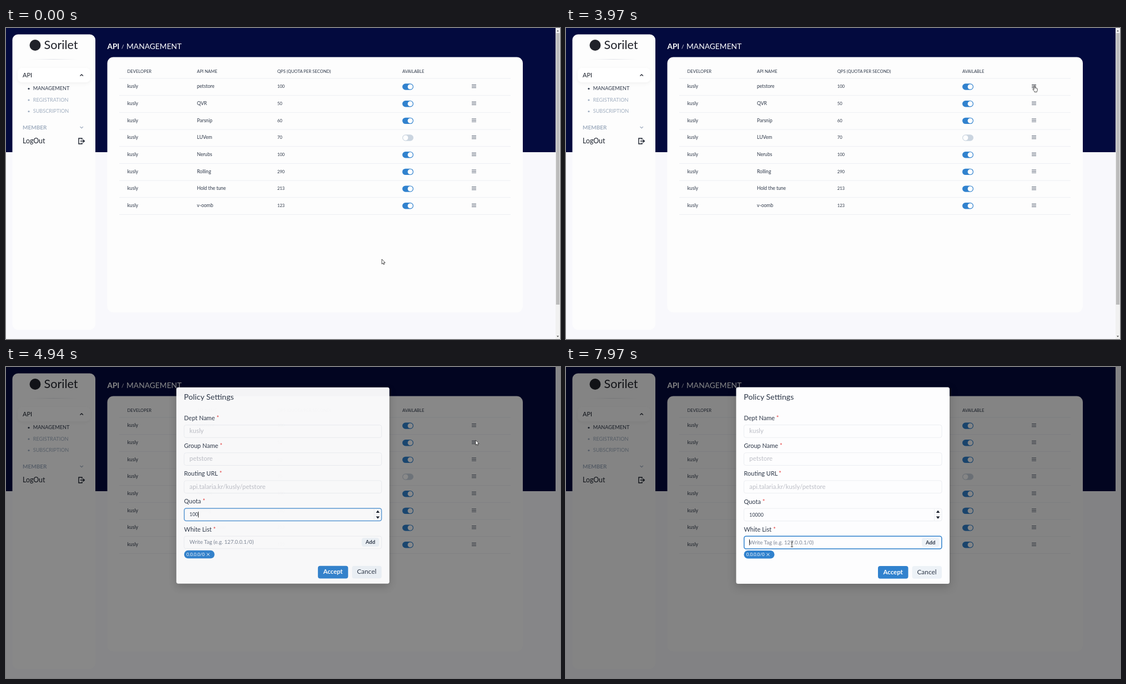
An HTML page that plays this animation: 998x561 px, repeating every 8 s.

```html
<!DOCTYPE html>
<html lang="en">
<head>
<meta charset="utf-8">
<title>API management</title>
<style>
  html, body { margin: 0; width: 100%; height: 100%; overflow: hidden; background: #f8f8fc; }
  svg { display: block; width: 998px; height: 561px; }
  text { font-family: Lato, "Open Sans", sans-serif; white-space: pre; }
  #apiBox { filter: drop-shadow(0 2px 3px #0000000d); }
  #menu rect:first-child { filter: drop-shadow(0 1px 3px #00000026); }
  #panel { filter: drop-shadow(0 5px 8px #00000033); }
</style>
</head>
<body>
<svg id="stage" viewBox="0 0 998 561" xmlns="http://www.w3.org/2000/svg">
  <defs>
    <linearGradient id="fade">
      <stop offset="0" stop-color="#dfe1e6" stop-opacity="0"/>
      <stop offset=".5" stop-color="#dfe1e6"/>
      <stop offset="1" stop-color="#dfe1e6" stop-opacity="0"/>
    </linearGradient>
  </defs>
  <g id="page"></g>
  <g id="scrollbar"></g>
  <g id="menu"></g>
  <rect id="dim" width="998" height="561" fill="#000"/>
  <g id="modal"></g>
  <g id="pointer" stroke-linejoin="round">
    <path id="arrow" d="M0 0V8.8L2 7 3.2 9.8 4.6 9.2 3.5 6.4H6.1Z" fill="#fff" stroke="#222" stroke-width=".8"/>
    <path id="hand" d="M.1 5.9V1Q.1 0 1 0T1.9 1V4Q3.2 3.5 3.5 4.4 4.6 4 4.9 4.9 6.1 4.7 6.1 6V8.2Q6.1 9.3 5.3 10.4V11.4H.9V10.4L-2 7.2Q-2.3 6-1.3 5.9L.1 7.1Z"
      fill="#fff" stroke="#222" stroke-width=".8"/>
    <path id="beam" d="M-2-4.5H-.7L0-4 .7-4.5H2M0-4V4M-2 4.5H-.7L0 4 .7 4.5H2" fill="none" stroke="#222" stroke-width=".9"/>
  </g>
</svg>
<script>
const LOOP = 8000;
const INK = '#2d3748', MUTED = '#a0aec0', BLUE = '#3182ce', PALE = '#edf2f7', LINE = '#edeff3', PAPER = '#fdfdfd';
const $ = id => document.getElementById(id);

function add(parent, tag, attrs, content) {
  const node = document.createElementNS('http://www.w3.org/2000/svg', tag);
  for (const key in attrs) node.setAttribute(key, attrs[key]);
  if (content !== undefined) node.textContent = content;
  return parent.appendChild(node);
}
const box = (parent, x, y, width, height, rx, fill, more) =>
  add(parent, 'rect', { x, y, width, height, rx, fill, ...more });
const label = (parent, x, y, size, content, fill = INK, more) =>
  add(parent, 'text', { x, y, 'font-size': size, fill, ...more }, content);
const stroke = (parent, d, color, width = 1) =>
  add(parent, 'path', { d, fill: 'none', stroke: color, 'stroke-width': width });
const fillPath = (parent, d, fill) => add(parent, 'path', { d, fill });

function drawSidebar(g) {
  box(g, 11.5, 11.5, 149.5, 533, 10, PAPER);
  add(g, 'circle', { cx: 52.5, cy: 31, r: 10, fill: '#20222a' });
  label(g, 68.5, 38, 21.6, 'Sorilet', '#20222a');
  box(g, 42, 56, 87, 1, 0, 'url(#fade)');
  box(g, 21, 72, 131, 26, 8, '#fff', { id: 'apiBox' });
  label(g, 30, 88.6, 11, 'API', '#1a202c');
  stroke(g, 'M133.5 86.5 136.2 83.8 138.9 86.5', '#1a202c', 1.3);
  ['MANAGEMENT', 'REGISTRATION', 'SUBSCRIPTION'].forEach((name, i) => {
    const y = 109 + i * 20.5, color = i ? MUTED : INK;
    add(g, 'circle', { cx: 41, cy: y + .5, r: 1.6, fill: color });
    label(g, 48.7, y + 3.4, 9.15, name, color);
  });
  label(g, 30, 182.6, 10, 'MEMBER', MUTED, { 'font-weight': 700 });
  stroke(g, 'M133.5 178 136.2 180.7 138.9 178', MUTED, 1.2);
  label(g, 30, 207.8, 12.4, 'LogOut', '#1a202c');
  stroke(g, 'M137 201.5V199H131V209H137V206.5M134 204H141M138.8 201.6 141.3 204 138.8 206.4', '#1a202c', 1.4);
}

const columns = [[218.5, 'DEVELOPER'], [344, 'API NAME'], [488.7, 'QPS (QUOTA PER SECOND)'], [714, 'AVAILABLE']];
const apis = [['petstore', 100], ['QVR', 50], ['Parsnip', 60], ['LUVem', 70],
  ['Nerubs', 100], ['Rolling', 290], ['Hold the tune', 213], ['v-oomb', 123]];

function drawTable(g) {
  label(g, 182.5, 37.7, 13.6, 'API', '#fff', { 'font-weight': 700 });
  label(g, 208, 37, 10, '/', '#fff');
  label(g, 217, 37.7, 13.8, 'MANAGEMENT', '#fff');
  box(g, 182.5, 52.5, 748.5, 460.5, 11, PAPER);
  columns.forEach(([x, name]) => label(g, x, 81.3, 7.7, name));
  stroke(g, 'M204 91H909', LINE);
  apis.forEach(([name, quota], i) => {
    const y = 105.5 + i * 30.68, on = i !== 3;
    ['kusly', name, quota].forEach((cell, c) => label(g, columns[c][0], y + 2.8, c < 2 ? 8.6 : 7.7, cell));
    box(g, 714, y - 5.2, 20, 11.4, 5.7, on ? BLUE : '#cbd5e0');
    add(g, 'circle', { cx: on ? 728.2 : 719.8, cy: y + .5, r: 4.6, fill: '#fff' });
    const bars = stroke(g, [-3, -.4, 2.2].map(d => `M839 ${y + d}H847`).join(''), '#4a5568', .9);
    if (!i) bars.id = 'firstBars';
    stroke(g, `M204 ${y + 16.2}H909`, LINE);
  });
}

function drawMenu(g) {
  box(g, 832, 114, 121, 43.5, 3.5, '#fff');
  box(g, 832, 118.5, 121, 17.5, 0, '#e3e7f0', { id: 'editRow' });
  label(g, 852, 130.3, 10, 'Edit');
  label(g, 852, 148, 10.2, 'Delete');
  stroke(g, 'M842 124.5H839.2V130.3H844.8V127.5M841.3 128.3 845 124.4', INK, .9);
  fillPath(g, 'M839.3 142H841L841.5 141H843L843.5 142H845V143H839.3ZM839.8 143.7H844.5L844.1 148.4H840.2Z', INK);
}

function drawModal(g) {
  box(g, 306.5, 36.5, 384.5, 354.5, 3.5, '#fdfdfe', { id: 'panel' });
  label(g, 320.3, 58.8, 14.2, 'Policy Settings');
  const fields = [['Dept Name', 'kusly'], ['Group Name', 'petstore'], ['Routing URL', 'api.talaria.kr/kusly/petstore'],
    ['Quota'], ['White List']];
  fields.forEach(([name, value], i) => {
    const y = 104.5 + i * 50.2;
    const title = label(g, 320.5, y - 8.6, 11, name);
    add(title, 'tspan', { dx: 3, fill: '#e53e3e' }, '*');
    box(g, 320.5, y, 356.5, 22.7, 3.5, 'none', { stroke: '#eceef2' });
    if (value) label(g, 330.3, y + 14.7, 11.4, value, '#bcbec6');
  });
  const focus = (id, y) => box(g, 320.8, y, 356, 22.7, 3.5, 'none', { id, stroke: BLUE, 'stroke-width': 1.5 });
  focus('quotaFocus', 255);
  focus('listFocus', 305.2);
  stroke(g, 'M663.5 256V277M663.5 266.5H676', LINE);
  fillPath(g, 'M666.8 263H673.4L670.1 258.6ZM666.8 269.5H673.4L670.1 273.9Z', '#1a202c');
  label(g, 330.3, 269.6, 8.8, '', INK, { id: 'quota' });
  label(g, 330.3, 319.6, 9.7, 'Write Tag (e.g. 127.0.0.1/0)', '#7b8494');
  box(g, 0, 0, .9, 10.5, 0, '#111', { id: 'caret' });
  box(g, 641, 308.3, 31.5, 16, 4, PALE);
  label(g, 656.7, 319.6, 9.5, 'Add', INK, { 'text-anchor': 'middle', 'font-weight': 700 });
  box(g, 320.5, 331, 55, 14.5, 7.2, BLUE);
  label(g, 324.8, 341.2, 8.1, '0.0.0.0/0', '#fff');
  stroke(g, 'M361.4 335.8 366.4 340.8M366.4 335.8 361.4 340.8', '#fff', .9);
  box(g, 562, 359, 54.5, 22.7, 4, BLUE);
  label(g, 589.2, 373.6, 11.4, 'Accept', '#fff', { 'text-anchor': 'middle', 'font-weight': 700 });
  box(g, 623.5, 359, 53.5, 22.7, 4, PALE);
  label(g, 650, 373.6, 11.9, 'Cancel', INK, { 'text-anchor': 'middle' });
}

const page = $('page'), bar = $('scrollbar');
box(page, 0, 0, 998, 561, 0, '#f8f8fc');
box(page, 0, 0, 990, 224, 0, '#030a3e');
drawSidebar(page);
drawTable(page);
box(bar, 990, 0, 8, 561, 0, '#f1f1f1');
box(bar, 990.8, 9, 6.4, 490, 0, '#bcbcbc');
fillPath(bar, 'M992 6.3H996L994 3.8ZM992 555.2H996L994 557.7Z', '#555');
drawMenu($('menu'));
drawModal($('modal'));

const clamp = v => Math.min(1, Math.max(0, v));
const progress = (t, start, length) => clamp((t - start) / length);
const smooth = u => u * u * (3 - 2 * u);
const easeOut = u => 1 - (1 - u) ** 2.9;

// time, x, y of each pointer stop
const stops = [[0, 677, 417], [1400, 677, 417], [2500, 731, 106.5], [3330, 731, 106.5], [3850, 843, 104],
  [4130, 843, 104], [4500, 846, 132], [5150, 846, 132], [5750, 439, 276], [6950, 439, 276], [7400, 407, 320], [LOOP, 407, 320]];

function pointerAt(t) {
  const i = stops.findIndex((s, n) => n && t < s[0]);
  const [t0, x0, y0] = stops[i - 1], [t1, x1, y1] = stops[i];
  const u = smooth((t - t0) / (t1 - t0));
  return [x0 + (x1 - x0) * u, y0 + (y1 - y0) * u];
}

function pointerKind(t, x, y) {
  if (t < 4130) {
    const overToggle = x > 714 && x < 734 && Math.abs(y - 106) < 6;
    return overToggle || x > 838 ? 'hand' : 'arrow';
  }
  const overField = x > 320 && x < 640 && ((y > 255 && y < 278) || (y > 305 && y < 328));
  return t > 4805 && overField ? 'beam' : 'arrow';
}

const show = (id, on) => $(id).setAttribute('visibility', on ? 'visible' : 'hidden');
const fadeTo = (id, v) => $(id).setAttribute('opacity', v);
const zoom = (id, x, y, s) => $(id).setAttribute('transform', `translate(${x} ${y}) scale(${s}) translate(${-x} ${-y})`);

function render(t) {
  const [x, y] = pointerAt(t), kind = pointerKind(t, x, y);
  $('pointer').setAttribute('transform', `translate(${x} ${y})`);
  ['arrow', 'hand', 'beam'].forEach(id => show(id, id === kind));

  const menuIn = easeOut(progress(t, 4020, 150)), menuOut = progress(t, 4775, 100);
  fadeTo('menu', menuIn * (1 - menuOut));
  zoom('menu', 832, 114, (.8 + .2 * menuIn) * (1 - .13 * menuOut));
  fadeTo('editRow', y > 118.5 ? 1 : 0);
  $('firstBars').setAttribute('stroke', t > 3750 && t < 4805 ? '#1a202c' : '#4a5568');

  const open = easeOut(progress(t, 4805, 200));
  show('scrollbar', t < 4805);
  fadeTo('dim', .48 * open);
  fadeTo('modal', open);
  zoom('modal', 498.75, 213.75, .95 + .05 * open);

  const inList = t >= 7450;
  fadeTo('quotaFocus', inList ? 0 : progress(t, 4840, 130));
  fadeTo('listFocus', inList ? progress(t, 7450, 130) : 0);
  $('quota').textContent = t < 6250 ? '100' : t < 6650 ? '1000' : '10000';
  const caret = $('caret'), focusedAt = inList ? 7450 : t >= 6650 ? 6650 : t >= 6250 ? 6250 : 4805;
  caret.setAttribute('x', inList ? 330 : 330.6 + $('quota').getComputedTextLength());
  caret.setAttribute('y', inList ? 311 : 261);
  const blink = Math.floor((t - focusedAt) / 500) % 2 === 0;
  fadeTo('caret', blink || t > LOOP - 60 ? 1 : 0);
}

function tick() {
  render(performance.now() % LOOP);
  requestAnimationFrame(tick);
}
tick();
</script>
</body>
</html>
```
